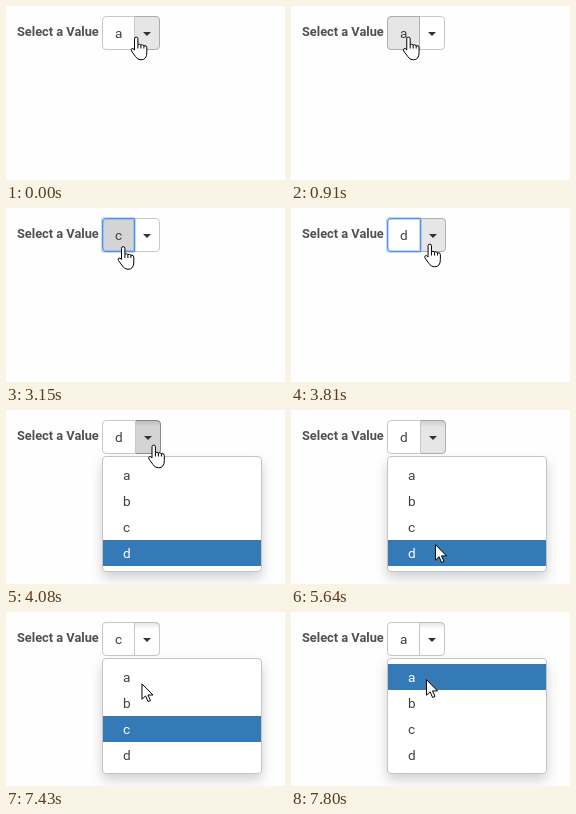
These frames come from a looping animation (279 px wide and 174 px high, 8 s). An HTML page:

```html
<!DOCTYPE html>
<html lang="en">
<meta charset="utf-8">
<title>Select a Value</title>
<style>
html, body { margin: 0; width: 100%; height: 100%; overflow: hidden; background: #fefefe; }
svg { display: block; width: 279px; height: 174px; }
text { font: 13.6px Roboto, "Open Sans", sans-serif; fill: #404040; }
#label { font-size: 12.8px; font-weight: 700; fill: #505050; }
#panel { fill: #fff; stroke: #c4c4c4; filter: drop-shadow(0 6px 6px rgba(0, 0, 0, .175)); }
#highlight { fill: #337ab7; }
#focus { fill: none; stroke: #4d90fe; stroke-opacity: .35; stroke-width: 3; }
.idle { fill: #fff; stroke: #c8c8c8; }
.hover { fill: #e6e6e6; stroke: #adadad; }
.active { fill: #d4d4d4; stroke: #8c8c8c; }
.focused { stroke: #5b8fdd; }
.cursor { fill: #fff; stroke: #000; stroke-linejoin: round; }
</style>
<svg viewBox="0 0 279 174">
  <defs>
    <linearGradient id="inset" x1="0" y1="0" x2="0" y2="1">
      <stop offset="0" stop-opacity=".11"/>
      <stop offset=".2" stop-opacity="0"/>
    </linearGradient>
  </defs>
  <text id="label" x="11" y="30">Select a Value</text>
  <path id="toggle"/>
  <path id="toggleInset" fill="url(#inset)"/>
  <path id="caret" fill="#333"/>
  <path id="button"/>
  <rect id="focus" x="96.5" y="10.5" height="33" rx="2"/>
  <text id="value" x="109" y="32"></text>
  <g id="menu">
    <rect id="panel" x="96.5" y="46.5" width="159" height="115" rx="3.5"/>
    <rect id="highlight" x="97" width="158" height="26"/>
  </g>
  <path id="hand" class="cursor" d="M4 13.5V2.3a1.7 1.7 0 0 1 3.4 0V8.3q1.6-1.4 3 .3q1.6-1 3 .6q2.9-.6 2.9 2V16Q16.3 23.3 10.5 23.3Q6.8 23.3 5 20L1 14.6Q.2 13 1.2 12.2Q2.4 11.4 4 13.5Z M7.4 8.3V12M10.4 8.6V12M13.4 9.2V12"/>
  <path id="arrow" class="cursor" d="M.5 .7V16.2L4.1 12.8L6.6 18.5L9 17.4L6.5 11.9H11.5Z"/>
</svg>
<script>
const LOOP = 8000;
const STEP = 120; // the pointer is sampled in coarse ticks
const LETTERS = [...'abcd'];
const OPEN_TIME = 4080;
const PRESS_TIME = 3150;

const START = { x: 124.5, y: 30.5 };
const MOVES = [
  { time: 760, ticks: 4, x: 106.5, y: 30.5 },
  { time: 1610, ticks: 4, x: 111.5, y: 38 },
  { time: 3660, ticks: 4, x: 142, y: 34.5 },
  { time: 5200, ticks: 1, x: 140, y: 37.5 },
  { time: 5350, ticks: 3, x: 144, y: 134 },
  { time: 5770, ticks: 3, x: 141, y: 121 },
  { time: 7160, ticks: 4, x: 135, y: 67 },
];
const CHOICES = [
  { time: 0, value: 'a' },
  { time: 1300, value: 'b' },
  { time: 2490, value: 'c' },
  { time: 3290, value: 'd' },
  { time: 6160, value: 'c' },
  { time: 7800, value: 'a' },
];

const $ = id => document.getElementById(id);
const set = (id, attrs) => Object.entries(attrs).forEach(([k, v]) => $(id).setAttribute(k, v));
const show = (id, on) => set(id, { visibility: on ? 'visible' : 'hidden' });
const easeOut = p => Math.sin(p * Math.PI / 2);

LETTERS.forEach((letter, i) => {
  const item = document.createElementNS('http://www.w3.org/2000/svg', 'text');
  item.id = 'item-' + letter;
  item.textContent = letter;
  $('menu').append(item);
  set(item.id, { x: 117, y: 70 + 26 * i });
});

function pointerAt(t) {
  let { x, y } = START;
  for (const move of MOVES.filter(m => m.time <= t)) {
    const tick = Math.floor((t - move.time) / STEP) + 1;
    const p = easeOut(Math.min(1, tick / move.ticks));
    x += (move.x - x) * p;
    y += (move.y - y) * p;
  }
  return { x, y };
}

function draw(t) {
  const choice = CHOICES.findLast(c => c.time <= t);
  const { value } = choice;
  const split = 'bd'.includes(value) ? 130 : 129;
  const open = t >= OPEN_TIME;
  const focused = t >= CHOICES[1].time && !open;
  const pressed = t >= PRESS_TIME && choice.time < PRESS_TIME;

  const { x, y } = pointerAt(t);
  const onBar = y < 46;
  const overToggle = onBar && x + 6 > split;
  const toggleHeld = open && choice.time < OPEN_TIME;
  const buttonState = !onBar || overToggle ? 'idle' : pressed ? 'active' : 'hover';
  const toggleState = overToggle && open ? 'active' : overToggle || toggleHeld ? 'hover' : 'idle';
  const toggleShape = `M${split - .5} 10.5h21.5q3.5 0 3.5 3.5v26q0 3.5-3.5 3.5h-21.5z`;

  $('value').textContent = value;
  set('button', {
    d: `M${split - .5} 10.5H100q-3.5 0-3.5 3.5v26q0 3.5 3.5 3.5H${split - .5}z`,
    class: buttonState + (focused ? ' focused' : ''),
  });
  set('toggle', { d: toggleShape, class: toggleState });
  set('toggleInset', { d: toggleShape });
  set('caret', { d: `M${split + 8} 26h8l-4 4z` });
  set('focus', { width: split - 97 });
  set('highlight', { y: 52 + 26 * LETTERS.indexOf(value) });
  LETTERS.forEach(letter => {
    $('item-' + letter).style.fill = letter === value ? '#fff' : '';
  });
  show('focus', focused);
  show('menu', open);
  show('toggleInset', open);
  show('hand', onBar);
  show('arrow', !onBar);
  set(onBar ? 'hand' : 'arrow', { transform: `translate(${x} ${y})` });
}

const start = performance.now();
function tick() {
  draw((performance.now() - start) % LOOP);
  requestAnimationFrame(tick);
}
tick();
</script>
</html>
```
